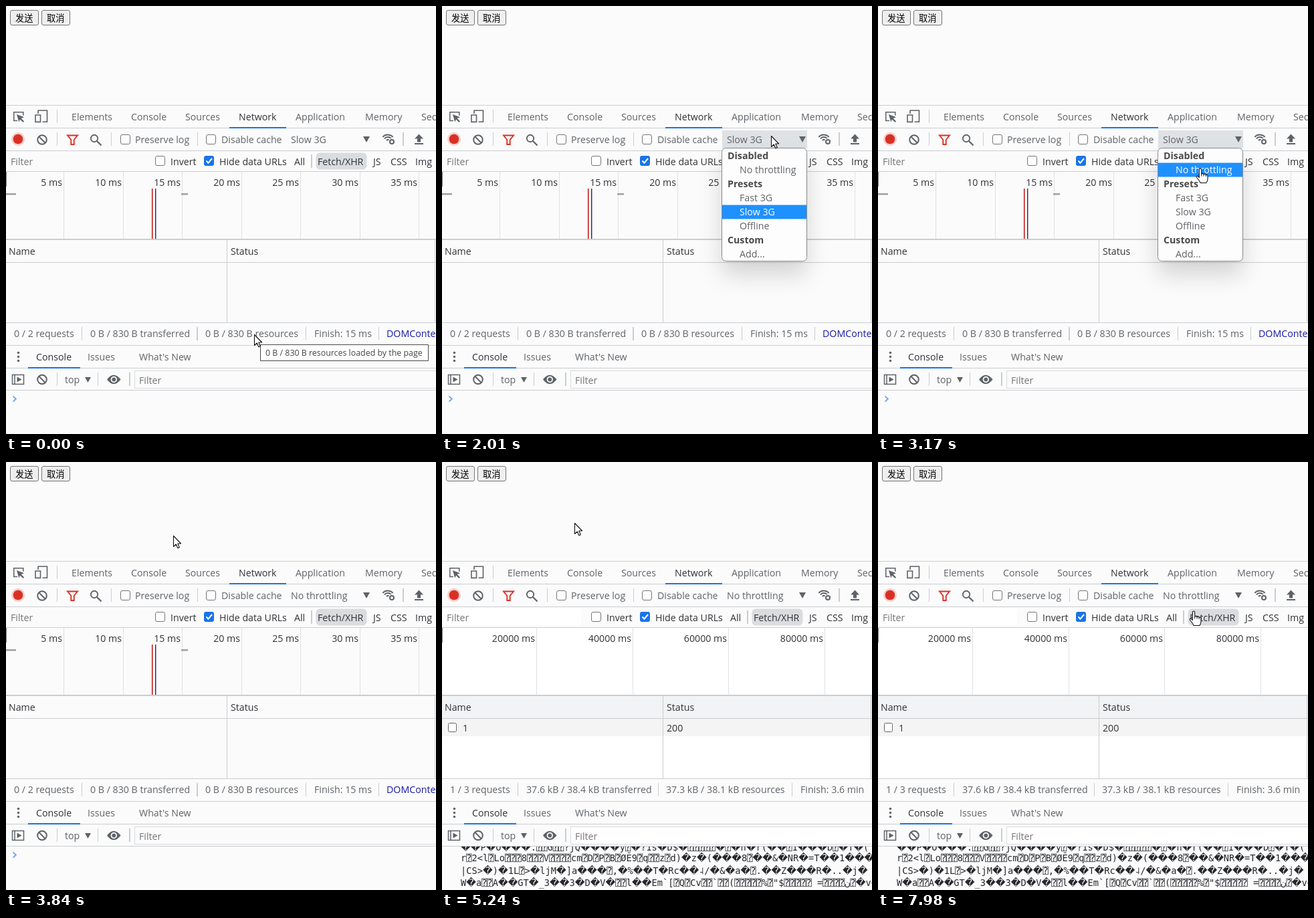
An HTML page with a canvas that plays this animation: 643x640 px, repeating every 8 s.

```html
<!DOCTYPE html>
<html lang="en">
<head>
<meta charset="utf-8">
<title>Network panel</title>
<style>
html, body { margin: 0; width: 643px; height: 640px; overflow: hidden; background: #fbfbfb; }
canvas { display: block; }
</style>
</head>
<body>
<canvas id="stage" width="643" height="640"></canvas>
<script>
const g = document.getElementById('stage').getContext('2d');
const LOOP = 8000;
const UI = '14.2px "Open Sans", sans-serif';
const BOLD = 'bold ' + UI;
const TIP = '12.4px "Open Sans", sans-serif';
const CJK = '13.3px "Noto Sans CJK SC", "Noto Sans CJK", sans-serif';
const MONO = '13.7px "DejaVu Sans Mono", monospace';
const WIDE = '14.4px "DejaVu Sans", sans-serif';
const INK = '#303236', GREY = '#5f6368', SOFT = '#757575', LINE = '#cacdd1', BLUE = '#1a73e8', BG = '#fbfbfb';

// Moments at which the interface changes
const LEAVE = 120, HOVER = 1520, OPEN = 1880, CLOSE = 3420, SEND = 4380, DONE = 5100;

// Pointer: time, x, y; it jumps from one place to the next
const PATH = [
  [0, 371, 491], [120, 294, 349], [260, 223, 40], [400, 180, 29], [530, 170, 32], [670, 165, 38],
  [1100, 178, 42], [1250, 440, 228], [1400, 489, 228], [1520, 492, 215], [1640, 492, 200], [2010, 492, 194],
  [2440, 492, 200], [2570, 490, 212], [2700, 488, 226], [2830, 485, 238], [3170, 482, 243],
  [3570, 470, 232], [3700, 380, 180], [3840, 250, 110], [3970, 140, 60], [4110, 60, 28], [4240, 30, 18],
  [4820, 60, 40], [4960, 198, 91], [5250, 250, 300], [5390, 290, 370], [5530, 305, 390], [5820, 313, 396],
  [5940, 279, 394], [6520, 211, 420], [6670, 112, 510], [6820, 88, 560], [6970, 104, 589],
  [7280, 150, 560], [7420, 300, 430], [7560, 400, 300], [7700, 455, 215], [7840, 470, 195], [7980, 472, 223]
];

const DUMP = [
  [581, '��P�O���.⍰⍰G⍰⍰?jQ����y⍰�?1s�D$�⍰⍰⍰⍰⍰�⍰�n�r(��⍰1���D⍰�T�('],
  [597, 'r⍰2<l⍰Lo⍰⍰⍰8⍰⍰⍰V⍰⍰⍰⍰cm⍰D⍰P⍰B⍰ØĔ9⍰q⍰⍰z⍰d)�z�(���8⍰��&�NR�=T��1���'],
  [616, '|CS>�)�1L⍰>�ljM�]a���⍰,�%��T�Rc��˨/�&�a�⍰.��Z���R�..�j�'],
  [634, 'W�a⍰⍰A��GT�_3��3�D�V�⍰⍰l��Em`[⍰Q⍰Cv⍰⍰`⍰⍰(⍰⍰⍰⍰⍰%⍰"$⍰⍰⍰⍰⍰ =⍰⍰⍰⍰ن⍰�v<']
];

function rect(x, y, w, h, color) {
  g.fillStyle = color;
  g.fillRect(x, y, w, h);
}

function text(s, x, y, color = INK, font = UI, align = 'left') {
  g.font = font;
  g.textAlign = align;
  g.fillStyle = color;
  g.fillText(s, x, y);
}

function box(x, y, w, h, r, fill, stroke) {
  g.beginPath();
  g.roundRect(x + .5, y + .5, w - 1, h - 1, r);
  if (fill) { g.fillStyle = fill; g.fill(); }
  if (stroke) { g.strokeStyle = stroke; g.lineWidth = 1; g.stroke(); }
}

function stroke(d, color = GREY, width = 1.7) {
  g.strokeStyle = color;
  g.lineWidth = width;
  g.stroke(new Path2D(d));
}

function fill(d, color = GREY) {
  g.fillStyle = color;
  g.fill(new Path2D(d));
}

function disc(x, y, r, color) {
  g.beginPath();
  g.arc(x, y, r, 0, 7);
  g.fillStyle = color;
  g.fill();
}

function ring(x, y, r, width = 1.8, from = 0, to = 7) {
  g.beginPath();
  g.arc(x, y, r, from, to);
  g.strokeStyle = GREY;
  g.lineWidth = width;
  g.stroke();
}

const sep = (x, y, w = 1, h = 20) => rect(x, y, w, h, LINE);
const rule = (y, h = 1) => rect(0, y, 643, h, LINE);

function clearIcon(x, y) {
  ring(x, y, 6.8, 2);
  stroke(`M${x - 5} ${y - 5}l10 10`, GREY, 2);
}

function page(hot) {
  box(6, 6, 43, 23, 2.5, hot ? '#e5e5e5' : '#efefef', hot ? '#4f4f4f' : '#767676');
  box(53, 6, 43, 23, 2.5, '#efefef', '#767676');
  text('发送', 14, 22.5, '#000', CJK);
  text('取消', 61, 22.5, '#000', CJK);
}

function tabs() {
  rule(148);
  stroke('M17 171.5h-5.2v-12.7h14v5', GREY, 1.5);
  fill('M16 162l11 4.3-4.3 1.7 4.3 4.3-1.6 1.6-4.4-4.4-1.7 4z');
  stroke('M48 161v-4.7h13.5v17h-7', GREY, 1.6);
  stroke('M44 163h7.5v10.4H44z', GREY, 1.6);
  sep(76, 155);
  const names = { Elements: 98, Console: 187, Sources: 268, Network: 348, Application: 433, Memory: 537, Security: 621 };
  for (const n in names) text(n, names[n], 171, n === 'Network' ? INK : GREY);
  rule(182);
  rect(334, 181, 85, 2, BLUE);
}

function toolbar(speed, hover) {
  disc(18, 199, 10, '#f6cdca');
  disc(18, 199, 7.3, '#d93025');
  clearIcon(54, 200);
  sep(76, 189);
  stroke('M92 193.5h15l-5.3 6.5v7h-4.4v-7z', '#d93025', 1.9);
  ring(132, 198, 5.2, 1.9);
  stroke('M136 202l6.5 6.5', GREY, 2.2);
  sep(157, 189);
  box(171, 192, 15, 15, 2.5, '#fff', '#767676');
  text('Preserve log', 193, 205, GREY);
  sep(286, 189);
  box(299, 192, 15, 15, 2.5, '#fff', '#767676');
  text('Disable cache', 322, 205, GREY);
  if (hover) rect(419, 186, 127, 27, '#dfe2e5');
  text(speed, 426, 205, GREY);
  fill('M534 195h10l-5 9z');
  for (const r of [3, 7, 10.5]) ring(571, 203, r, 1.9, -2.4, -.75);
  disc(577, 203, 5.2, BG);
  ring(577, 203, 3, 2);
  sep(593, 189, 2);
  fill('M617.5 191.5l6.5 7h-4v5h-5v-5h-4z');
  rect(611, 205, 13, 2, GREY);
  rule(216);
}

function filters(done) {
  if (done) rect(2, 219, 206, 25, '#fff');
  text('Filter', 7, 238, SOFT);
  box(223, 224, 15, 15, 2.5, '#fff', '#767676');
  text('Invert', 246, 238);
  box(296, 224, 15, 15, 2, BLUE, BLUE);
  stroke('M299.5 231.5l3 3.2 5.5-6.7', '#fff', 2);
  text('Hide data URLs', 319, 238);
  text('All', 431, 238);
  sep(456, 222, 2);
  box(463, 219, 77, 26, 6, '#dadce0');
  text('Fetch/XHR', 466, 238);
  text('JS', 549, 238);
  text('CSS', 575, 238);
  text('Img', 612, 238);
  rule(247);
}

function overview(sent, done) {
  if (done) rect(0, 248, 643, 100, '#fff');
  const first = sent ? 141 : 86, step = sent ? 143.7 : 88.5, unit = sent ? 20000 : 5;
  for (let i = 0; i < 7; i++) {
    const x = Math.round(first + i * step);
    rect(x, 248, 1, 100, '#dfe1e4');
    text((i + 1) * unit + ' ms', x - 2, 269, INK, UI, 'right');
  }
  rect(0, 248, 1, 22, '#777');
  if (!sent) {
    rect(0, 280, 15, 2.5, '#a0a0a0');
    rect(262, 280, 10, 2.5, '#a0a0a0');
    rect(218, 273, 1.4, 75, '#c80000');
    rect(223, 273, 1.4, 75, '#24247a');
  }
  rule(348, 2);
}

function table(sent, done) {
  if (done) {
    rect(0, 350, 643, 33, '#f1f3f4');
    rect(0, 384, 643, 26, '#f4f4f4');
    rect(0, 410, 643, 63, '#fff');
  }
  text('Name', 4, 372);
  text('Status', 336, 372);
  rule(383);
  if (sent) {
    box(9, 390, 13, 14, 2, '#fff', '#666');
    text('1', 31, 403, '#4b2a18');
    text(done ? '200' : '(pending)', 336, 403, done ? INK : SOFT);
  }
  rect(330, 350, 1, 123, LINE);
  rect(641, 350, 1, 123, LINE);
  rule(473);
}

function summary(sent, done) {
  const sizes = done ? ['37.6 kB / 38.4 kB', '37.3 kB / 38.1 kB'] : ['0 B / 830 B', '0 B / 830 B'];
  text(sent ? '1 / 3 requests' : '0 / 2 requests', 12, 495, GREY);
  text(sizes[0] + ' transferred', 126, 495, GREY);
  text(sizes[1] + ' resources', done ? 335 : 298, 495, GREY);
  text(done ? 'Finish: 3.6 min' : 'Finish: 15 ms', done ? 536 : 461, 495, GREY);
  sep(113, 480);
  if (done) {
    sep(323, 480);
    sep(523, 480);
  } else {
    sep(285, 480, 2);
    sep(448, 480);
    sep(557, 480);
    text('DOMContentLoaded: 22 ms', 569, 495, '#1a1aa6');
  }
  rule(507);
}

function chevron(y) {
  stroke(`M10.5 ${y - 4}l4.5 4-4.5 4`, '#6ea2f5', 1.7);
}

function dump() {
  g.save();
  g.beginPath();
  g.rect(0, 575, 643, 65);
  g.clip();
  for (const [y, line] of DUMP) {
    let x = 28;
    for (const c of line) {
      const wide = c === '\ufffd';
      text(c, x, y, '#26282c', wide ? WIDE : MONO);
      x += wide ? 14.7 : 8.25;
    }
  }
  g.restore();
}

function drawer(sent, done) {
  for (const y of [518.5, 524.5, 530.5]) disc(18.5, y, 1.8, GREY);
  text('Console', 45, 530);
  text('Issues', 122, 530, GREY);
  text("What's New", 199, 530, GREY);
  rule(541);
  rect(33, 540, 78, 2, BLUE);
  stroke('M9.5 551.5h17v14h-17zM13 551v15', GREY, 1.5);
  fill('M16.5 554.5l7 4-7 4z');
  clearIcon(54, 558.5);
  sep(76, 548);
  text('top', 88, 564, GREY);
  fill('M118 555h9l-4.5 8z');
  sep(137, 548);
  fill('M151 558.5Q161 545 171.5 558.5 161 572 151 558.5');
  disc(161.3, 558.5, 4.7, BG);
  disc(161.3, 558.5, 2.9, GREY);
  sep(184, 548, 2);
  box(192, 545, 460, 27, 0, done ? '#fff' : null, '#d8dadd');
  text('Filter', 199, 565, SOFT);
  rule(574);
  if (done) return dump();
  if (sent) text('start', 28, 594, INK, MONO);
  chevron(sent ? 612.5 : 587.5);
}

function tooltip(s, x, y, w) {
  box(x, y, w, 25, 0, '#fff', '#4a4a4a');
  text(s, x + 8, y + 17, '#444', TIP);
}

function menu(active) {
  g.save();
  g.shadowColor = 'rgba(0,0,0,.16)';
  g.shadowBlur = 34;
  g.shadowOffsetY = 20;
  box(418, 212, 128, 170, 6, '#fdfdfd');
  g.restore();
  box(418, 212, 128, 170, 6, '#fdfdfd', '#8a8a8a');
  const items = ['Disabled', 'No throttling', 'Presets', 'Fast 3G', 'Slow 3G', 'Offline', 'Custom', 'Add...'];
  items.forEach((s, i) => {
    const y = 224 + i * 21;
    if (i === active) rect(419, y - 10.5, 126, 21, '#1e90ff');
    const group = i === 0 || i === 2 || i === 6;
    text(s, group ? 427 : 445, y + 5, i === active ? '#fff' : group ? '#4a4a4a' : '#5f6368', group ? BOLD : UI);
  });
}

function pointer(x, y) {
  const hand = x > 463 && x < 540 && y > 218 && y < 245;
  g.save();
  g.translate(x, y);
  g.lineJoin = 'round';
  const d = hand
    ? 'M-1.7 1Q0-1 1.7 1V8Q4 6.5 5 8.6 7.5 7.5 8.2 9.5 11 8.7 11 11.5V16Q10.5 19 9 21.5H0Q-1 18.5-5.5 13.5-6.5 11-4 11.2L-1.7 13.5z'
    : 'M.5.5V16.5L4.3 13 6.8 18.8 9.3 17.7 6.8 12H11.6z';
  fill(d, '#fff');
  stroke(d, '#111', 1.1);
  if (hand) stroke('M1.7 8v3.5M5 8.6v3M8.2 9.5v2.5', '#111', 1);
  g.restore();
}

function draw(t) {
  const [, x, y] = PATH.findLast(k => k[0] <= t);
  const sent = t >= SEND, done = t >= DONE;
  const open = t >= OPEN && t < CLOSE;
  rect(0, 0, 643, 640, BG);
  page(x < 49 && y < 29);
  tabs();
  toolbar(t < CLOSE ? 'Slow 3G' : 'No throttling', t >= HOVER && t < CLOSE);
  filters(done);
  overview(sent, done);
  table(sent, done);
  summary(sent, done);
  drawer(sent, done);
  if (open) menu(t > 2440 && y >= 234 ? 1 : 4);
  if (t < LEAVE) tooltip('0 B / 830 B resources loaded by the page', 380, 506, 252);
  if (t >= 6520 && t < 6670) tooltip('https://kelvuni.test/1', 323, 409, 148);
  pointer(x, y);
}

function tick() {
  draw(performance.now() % LOOP);
  requestAnimationFrame(tick);
}
tick();
</script>
</body>
</html>
```
